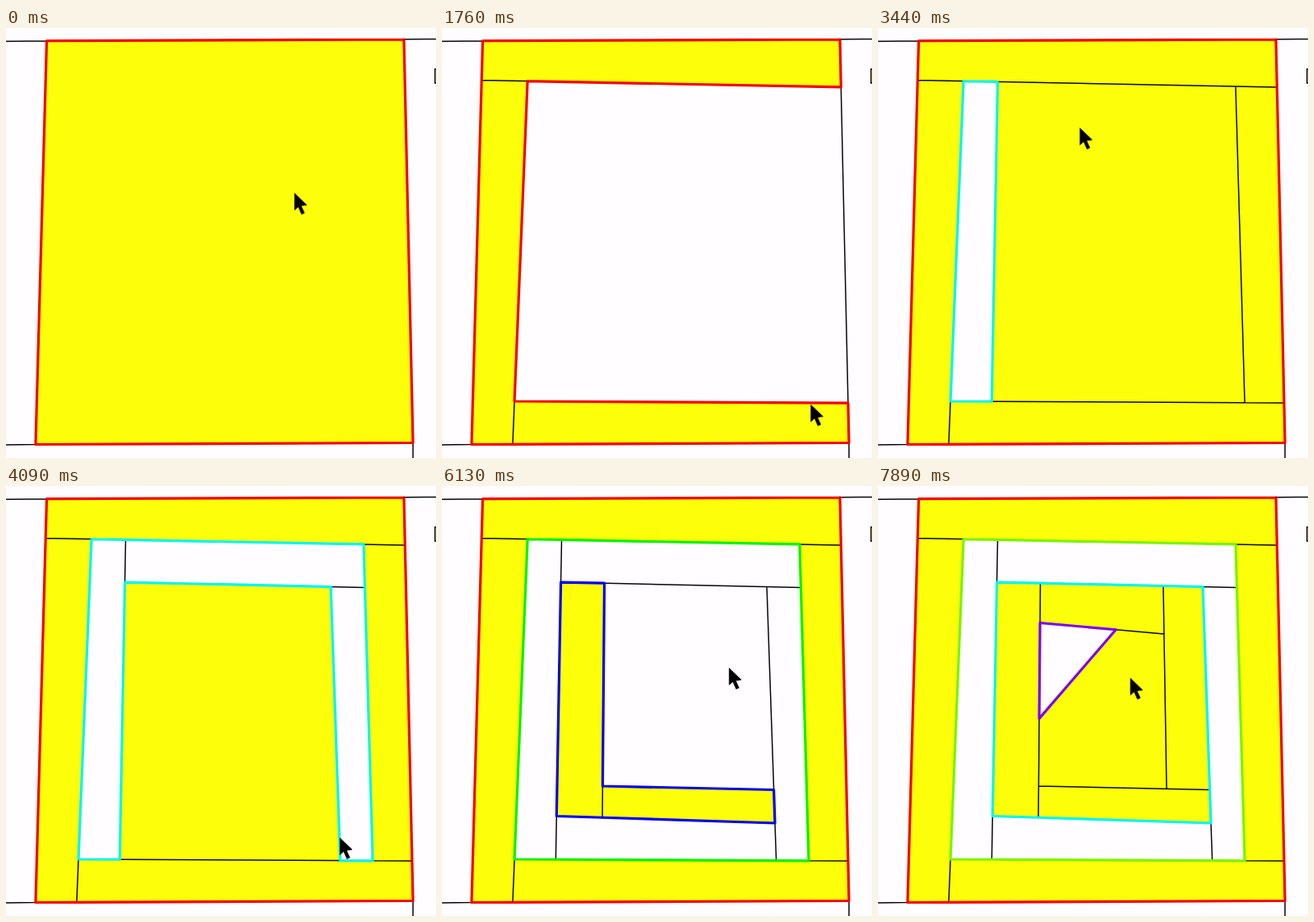
Recreate the animation shown at these times as an HTML page. Size 523 px wide and 523 px high, loop 7990 ms.

```html
<!DOCTYPE html>
<html lang="en">
<head>
<meta charset="utf-8">
<title>Cutting a square into rings</title>
<style>
  html, body { margin: 0; width: 100%; height: 100%; overflow: hidden; background: #fffdff; }
  svg { display: block; width: 100vw; height: 100vh; }
</style>
</head>
<body>
<svg viewBox="0 0 523 523">
  <path id="fill" fill="#fdff0a" fill-rule="evenodd"/>
  <path id="lines" fill="none" stroke="#080808" stroke-width="1.5"/>
  <g id="outlines" fill="none" stroke-width="3.2" stroke-linecap="round"></g>
  <path id="cursor" d="M0 0V20.5L4.5 16.5L8.5 25.5L12 24L8 15.3L14.8 14.3Z" stroke="#000" stroke-width=".6"/>
</svg>
<script>
const LOOP = 7990, TICKS = 86;
const DRAG = 3, PAUSE = 1; // in ticks
const CENTER = [270, 240];
const SQUARE = [[49.5, 15.7], [484, 13.8], [495, 504.5], [36, 506.5]];
const REST = [350.3, 198.5];
const $ = id => document.getElementById(id);

// Mouse drags: [tick of release, from x, y, to x, y]. Each one cuts the innermost face.
const drags = [
  [6, 400, 70.3, 186, 66.2],
  [12, 103, 90, 89.1, 430],
  [19, 112, 454.1, 448, 455.8],
  [27, 445.3, 430, 435.8, 100],
  [35, 144.5, 120, 138.8, 430],
  [39, 160, 117.4, 415, 123],
  [44, 396, 150, 405.5, 425.5],
  [50, 390, 409.5, 165, 402.3],
  [56, 197.3, 140, 195.2, 385],
  [62, 205, 365.2, 390, 369.2],
  [68, 347.7, 166, 350.3, 325],
  [73, 335, 178.8, 215, 168.1],
  [79, 280, 185.5, 210, 266.7],
  [86, 283, 380, 318, 157]
].map(([tick, x0, y0, x1, y1]) => ({ tick, from: [x0, y0], to: [x1, y1] }));

const mix = (p, q, k) => p.map((v, i) => v + (q[i] - v) * k);
const edges = face => face.map((p, i) => [p, face[(i + 1) % face.length]]);
const without = (list, other) => list.filter(([p, q]) => !other.some(e => e[0] === p && e[1] === q));
const closed = face => 'M' + face.join('L') + 'Z';
const segments = list => list.map(([p, q]) => `M${p}L${q}`).join('');

// Cuts a convex face along a drag and keeps the part around the center.
function cutFace(face, { from, to }) {
  const side = p => (to[0] - from[0]) * (p[1] - from[1]) - (to[1] - from[1]) * (p[0] - from[0]);
  const keep = p => side(p) * side(CENTER) > 0;
  const hits = [], rest = [];
  for (const [p, q] of edges(face)) {
    if (keep(p)) rest.push(p);
    if (keep(p) !== keep(q)) {
      const at = mix(p, q, side(p) / (side(p) - side(q)));
      hits.push({ p, q, at });
      rest.push(at);
    }
  }
  return { rest, hits };
}

// Adds the ends of a cut to the edges of a face that they lie on.
const addHits = (face, hits) => edges(face).flatMap(([p, q]) =>
  [p, ...hits.filter(h => h.p === p && h.q === q).map(h => h.at)]);

// One scene per number of cuts; four cuts make a ring.
function buildScenes() {
  const scenes = [{ rings: [SQUARE], rest: [], cuts: [] }];
  let rings = [SQUARE], face = SQUARE, cuts = [];
  drags.forEach((drag, i) => {
    if (i && i % 4 === 0) rings = [...rings, face];
    const { rest, hits } = cutFace(face, drag);
    rings = [...rings.slice(0, -1), addHits(rings.at(-1), hits)];
    cuts = [...cuts, hits.map(h => h.at)];
    face = rest;
    scenes.push({ rings, rest, cuts, ringDone: i % 4 === 3 });
  });
  return scenes;
}
const scenes = buildScenes();
const border = 'M0 16.3L49.5 15.7M484 13.8L523 13.5M0 507L36 506.5M495 504V523M523 50H521.8V67H523' + closed(SQUARE);

function showScene({ rings, rest, cuts, ringDone }) {
  const restEdges = edges(rest);
  const contours = rings.map(ring => without(edges(ring), restEdges));
  const inner = without(restEdges, edges(rings.at(-1)));
  if (ringDone) contours.push(inner);
  else contours.at(-1).push(...inner);

  $('fill').setAttribute('d', rings.map(closed).join('') + (rest.length ? closed(rest) : ''));
  $('lines').setAttribute('d', border + segments(cuts));
  $('outlines').innerHTML = contours.map((c, i) =>
    `<path d="${segments(c)}" stroke="hsl(${360 * i / contours.length}, 100%, 48%)"/>`).join('');
}

function cursorAt(tick) {
  const i = drags.findIndex(d => d.tick > tick);
  const drag = drags[i], last = drags[i - 1] || { tick: 0, to: REST };
  const start = drag.tick - DRAG;
  if (tick >= start) return mix(drag.from, drag.to, (tick - start) / DRAG);
  const travel = Math.max(1, start - PAUSE - last.tick);
  const k = Math.min(1, (tick - last.tick) / travel);
  return mix(last.to, drag.from, 1 - (1 - k) ** 3);
}

function draw(now) {
  const tick = Math.min(TICKS - 1, Math.floor((now % LOOP + 10) / LOOP * TICKS));
  const count = drags.filter(d => d.tick <= tick).length;
  if (count !== draw.count) showScene(scenes[count]);
  draw.count = count;
  const [x, y] = cursorAt(tick);
  $('cursor').setAttribute('transform', `translate(${x + .7} ${y + 2.5})`);
}

let begin;
function loop(now) {
  begin ??= now;
  draw(now - begin);
  requestAnimationFrame(loop);
}
draw(0);
requestAnimationFrame(loop);
</script>
</body>
</html>
```
